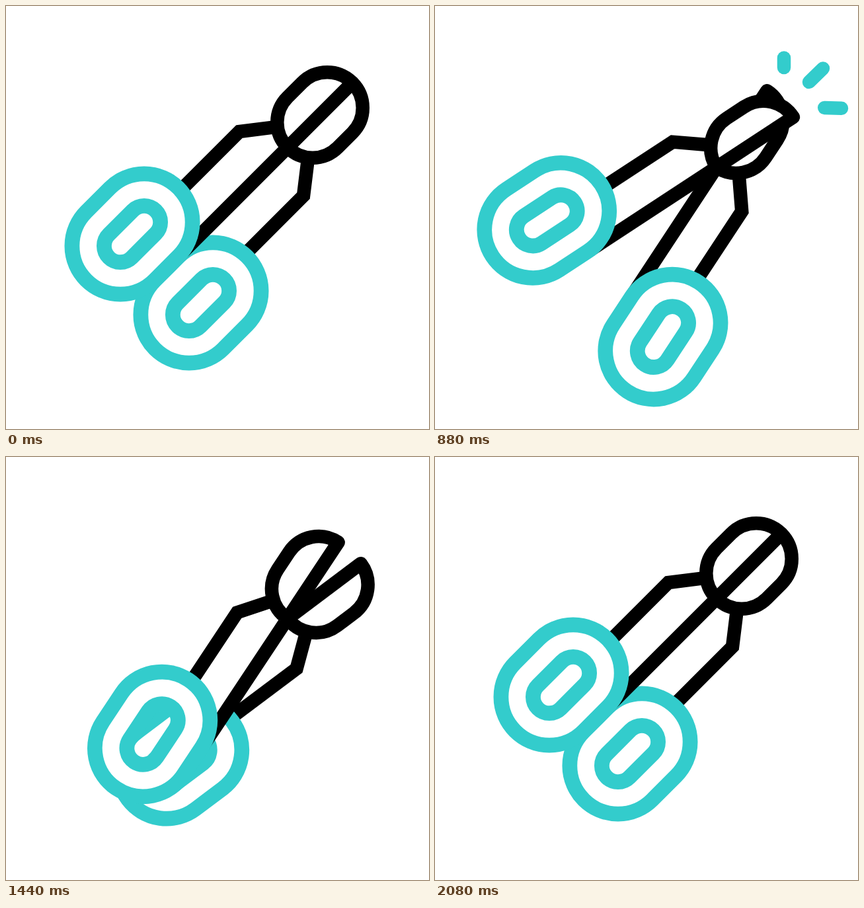
An HTML page that plays this animation: 640 by 640 pixels, repeating every 2.44 s.

```html
<!DOCTYPE html>
<html lang="en">
<head>
<meta charset="utf-8">
<title>Scissors</title>
<style>
  html, body { margin: 0; height: 100%; overflow: hidden; background: #fff; }
  svg { display: block; width: 100vw; height: 100vh; }
  .steel { fill: #fff; stroke: #000; stroke-width: 20.5; }
  .blade { stroke-linejoin: round; }
  .grip { fill: #fff; fill-rule: evenodd; stroke: #33cccc; stroke-width: 22.8; }
  .ray { stroke: #33cccc; stroke-width: 20.5; stroke-linecap: round; }
</style>
</head>
<body>
<svg viewBox="0 0 640 640">
  <defs>
    <!-- One half: pivot at the origin, tip to the right -->
    <g id="half">
      <path class="steel" d="M9-34.6L-34.6-68.6H-166L-234 0H0"/>
      <path class="steel blade" d="M0 0A53.7 53.7 0 0 1 53.7-53.7H84.9A53.7 53.7 0 0 1 138.6 0Z"/>
      <path class="grip" id="grip"/>
    </g>
  </defs>
  <use href="#half" id="lower"/>
  <use href="#half" id="upper"/>
  <g id="rays"></g>
</svg>
<script>
const LOOP = 2440;
const $ = id => document.getElementById(id);

const pill = r =>
  `M-284.3 ${-73.5 - r}h51a${r} ${r} 0 0 1 0 ${2 * r}h-51a${r} ${r} 0 0 1 0 ${-2 * r}z`;
$('grip').setAttribute('d', pill(73.1) + pill(24.6));

// Each key is [time, value]; eased in and out between neighbours
const DROP = [[220, 214], [1170, 252.2], [2080, 214]];
const UPPER = [[220, 0], [460, 3.5], [1000, -13.8], [1530, 13.3], [2080, 0]];
const LOWER = [[220, 0], [460, 2.7], [1000, -13.5], [1540, 10], [2080, 0]];

// Inner end, outer end, start time
const RAYS = [
  [586.5, 153.8, 615, 154.7, 580],
  [566, 115, 587, 94.5, 680],
  [528, 93, 528, 64, 780]
].map(ray => {
  const line = document.createElementNS('http://www.w3.org/2000/svg', 'line');
  line.setAttribute('class', 'ray');
  $('rays').append(line);
  return { line, ray };
});

const ease = p => (1 - Math.cos(Math.PI * Math.min(1, Math.max(0, p)))) / 2;

const at = (keys, t) => keys.slice(1).reduce((value, [end, to], i) => {
  const [start, from] = keys[i];
  return value + (to - from) * ease((t - start) / (end - start));
}, keys[0][1]);

function drawRay({ line, ray: [x1, y1, x2, y2, start] }, t) {
  const head = ease((t - start) / 200);
  const tail = ease((t - start - 260) / 200);
  const set = (name, from, to, p) => line.setAttribute(name, from + (to - from) * p);
  set('x1', x1, x2, tail);
  set('y1', y1, y2, tail);
  set('x2', x1, x2, head);
  set('y2', y1, y2, head);
  line.style.display = head > 0 && tail < 1 ? '' : 'none';
}

function draw(now) {
  const t = now % LOOP;
  const move = `translate(426 ${at(DROP, t)})`;
  $('upper').setAttribute('transform', `${move} rotate(${-45 - at(UPPER, t)})`);
  $('lower').setAttribute('transform', `${move} rotate(${-45 + at(LOWER, t)}) scale(1 -1)`);
  RAYS.forEach(r => drawRay(r, t));
}

let begin;
function tick(now) {
  begin ??= now;
  draw(now - begin);
  requestAnimationFrame(tick);
}
draw(0);
requestAnimationFrame(tick);
</script>
</body>
</html>
```
